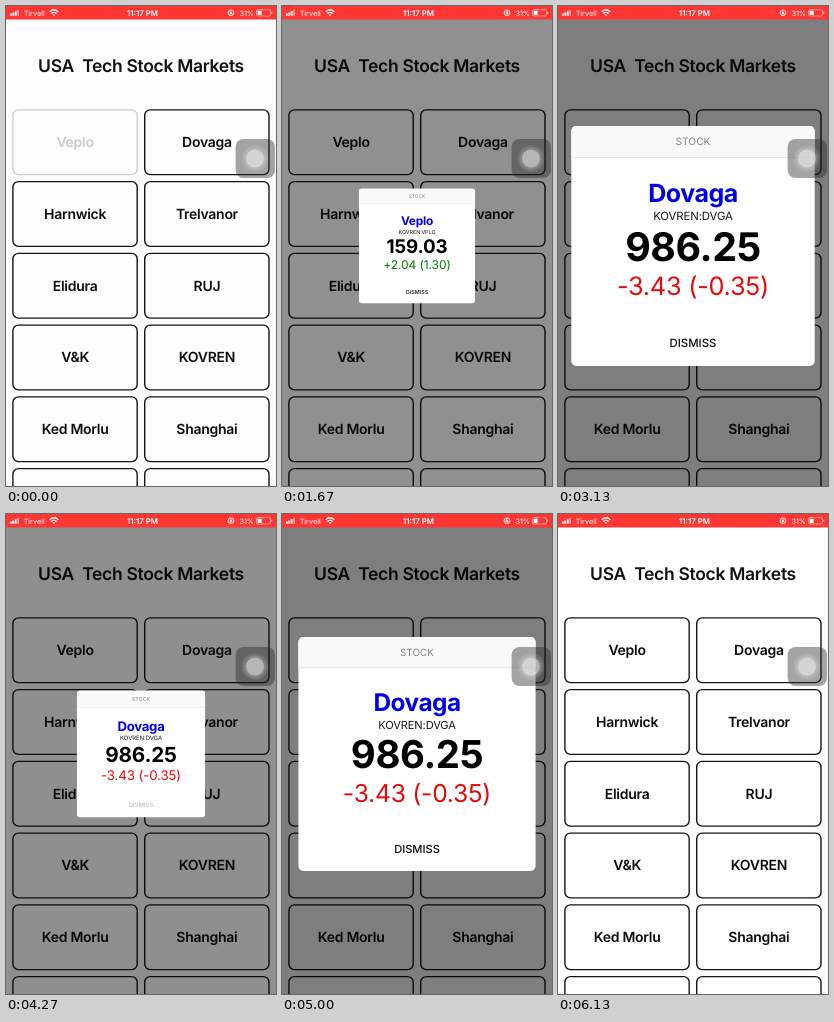
Recreate the animation shown at these times as an HTML page. Size 270x480 px, loop 6.47 s.

```html
<!DOCTYPE html>
<html lang="en">
<head>
<meta charset="utf-8">
<title>Stock markets</title>
<style>
  html, body { margin: 0; width: 100%; height: 100%; overflow: hidden; background: #fefefe; }
  svg { display: block; width: 100vw; height: 100vh; }
  text { font-family: Inter, Roboto, "Liberation Sans", sans-serif; text-anchor: middle;
         text-rendering: geometricPrecision; }
  .title { font-size: 17.5px; font-weight: 600; letter-spacing: -.018em; fill: #111; }
  .label { font-size: 14px; font-weight: 600; letter-spacing: -.02em; fill: #0c0c0c; }
  .box { fill: none; stroke: #141414; stroke-width: 1.4; }
  .bar text { fill: #fff; font-size: 7.3px; }
  .head { font-size: 10.2px; fill: #858585; }
  .name { font-size: 25px; font-weight: 700; letter-spacing: -.02em; fill: #0000e8; }
  .ticker { font-size: 11.4px; letter-spacing: -.01em; fill: #161616; }
  .price { font-size: 39.4px; font-weight: 700; letter-spacing: -.01em; fill: #000; }
  .change { font-size: 25.3px; letter-spacing: -.01em; }
  .dismiss { font-size: 11.4px; font-weight: 500; fill: #0c0c0c; }
</style>
</head>
<body>
<svg viewBox="0 0 270 480" preserveAspectRatio="none">
  <rect width="270" height="480" fill="#fefefe"/>
  <text class="title" x="135" y="66.4">USA&nbsp; Tech Stock Markets</text>
  <g id="grid"></g>
  <rect id="shade" y="13" width="270" height="467" opacity="0"/>

  <g id="popup">
    <rect x="13.3" y="120" width="243.4" height="240" rx="5" fill="#fff"/>
    <path d="M13.3 151.5V125a5 5 0 0 1 5-5H251.7a5 5 0 0 1 5 5V151.5Z" fill="#f8f9fa"/>
    <path d="M13.3 151.5H256.7" stroke="#dfe1e3" stroke-width=".8"/>
    <text class="head" x="135" y="139.2">STOCK</text>
    <text class="name" id="name" x="135" y="196.2"></text>
    <text class="ticker" id="ticker" x="135" y="214"></text>
    <text class="price" id="price" x="135" y="254.8"></text>
    <text class="change" id="change" x="135" y="288.8"></text>
    <text class="dismiss" id="dismiss" x="135" y="341.4">DISMISS</text>
  </g>

  <g class="bar">
    <rect width="270" height="13.5" fill="#fe3735"/>
    <g fill="#fff">
      <rect x="4" y="7.6" width="1.8" height="2.2" rx=".4"/>
      <rect x="6.4" y="6.4" width="1.8" height="3.4" rx=".4"/>
      <rect x="8.8" y="5.1" width="1.8" height="4.7" rx=".4"/>
      <rect x="11.2" y="3.8" width="1.8" height="6" rx=".4" opacity=".5"/>
    </g>
    <text x="28.2" y="9.6">Tirvell</text>
    <g fill="none" stroke="#fff" stroke-width="1.3">
      <path d="M43.8 5.8Q48 1.8 52.2 5.8M45.4 7.6Q48 5.2 50.6 7.6"/>
    </g>
    <path d="M46.7 8.7Q48 7.6 49.3 8.7L48 10Z" fill="#fff"/>
    <text x="136.5" y="9.7" style="font-weight:600;font-size:7.8px">11:17 PM</text>
    <circle cx="225" cy="6.8" r="2.9" fill="none" stroke="#fff" stroke-width=".8"/>
    <rect x="223.7" y="6.3" width="2.6" height="2" fill="#fff"/>
    <path d="M224.2 6.4V5.6a.8 .8 0 0 1 1.6 0V6.4" fill="none" stroke="#fff" stroke-width=".5"/>
    <text x="240.7" y="9.6">31%</text>
    <rect x="250.5" y="3.6" width="14" height="6.4" rx="1.5" fill="none" stroke="#fff" stroke-width=".8" opacity=".6"/>
    <rect x="251.6" y="4.7" width="4" height="4.2" rx=".6" fill="#fff"/>
    <path d="M265.7 5.8V7.8" stroke="#fff" stroke-width="1.1" opacity=".6"/>
  </g>

  <g id="assist">
    <rect x="229.6" y="133" width="39.4" height="39" rx="8" fill="#282828" opacity=".42"/>
    <g fill="#fff">
      <circle cx="249" cy="152.6" r="13.4" opacity=".1"/>
      <circle cx="249" cy="152.6" r="11.2" opacity=".14"/>
      <circle cx="249" cy="152.6" r="9" opacity=".4"/>
    </g>
  </g>
</svg>
<script>
const LOOP = 6470, STEP = 200 / 3, FRAMES = 97;
const LABELS = ["Veplo", "Dovaga", "Harnwick", "Trelvanor", "Elidura", "RUJ",
                "V&K", "KOVREN", "Ked Morlu", "Shanghai", "", ""];
const GREEN = "#008000", RED = "#e60c0c";
const STOCKS = [
  ["Veplo", "KOVREN:VPLO", "159.03", "+2.04 (1.30)", GREEN],
  ["Dovaga", "KOVREN:DVGA", "986.25", "-3.43 (-0.35)", RED],
  ["Harnwick", "KOVREN:HW", "174.21", "+0.47 (0.27)", GREEN]
];
// Each visit: button pressed, popup opens, data arrives, popup closes.
const VISITS = [
  { press: -60, open: -10, data: -10, close: 1615.5 },
  { press: 2199, open: 2300, data: 2866, close: 4218, tap: 4129 },
  { press: 4730, open: 4765, data: 5399, close: 5934 }
];

const $ = id => document.getElementById(id);
const clamp = x => Math.min(1, Math.max(0, x));
const ease = x => {
  x = clamp(x);
  return x < .5 ? 2 * x * x : 1 - 2 * (1 - x) ** 2;
};

// Slightly underdamped spring from 0 to 1.
function spring(ms) {
  if (ms <= 0) return 0;
  const t = ms / 1000, decay = 15.5, freq = 8.96;
  return 1 - Math.exp(-decay * t) * (Math.cos(freq * t) + decay / freq * Math.sin(freq * t));
}

// Opacity of a touchable: drops at once, then eases back after release.
function touch(t, down, up) {
  return t < down ? 1 : .2 + .8 * ease((t - up) / 250);
}

function add(parent, tag, attrs) {
  const el = document.createElementNS("http://www.w3.org/2000/svg", tag);
  for (const key in attrs) el.setAttribute(key, attrs[key]);
  return parent.appendChild(el);
}

const buttons = LABELS.map((label, i) => {
  const x = 6.9 + i % 2 * 131.8, y = 103.9 + Math.floor(i / 2) * 71.75;
  const g = add($("grid"), "g", {});
  add(g, "rect", { class: "box", x, y, width: 124.3, height: 64.7, rx: 5.5 });
  add(g, "text", { class: "label", x: x + 62.2, y: y + 37.3 }).textContent = label;
  return g;
});

let shown = -1;
function fill(i) {
  if (i === shown) return;
  shown = i;
  ["name", "ticker", "price", "change"].forEach((id, k) => $(id).textContent = STOCKS[i][k]);
  $("change").setAttribute("fill", STOCKS[i][4]);
}

function draw(t) {
  let current = 0, stock = 0;
  VISITS.forEach((v, i) => {
    if (t >= v.press) current = i;
    if (t >= v.data) stock = i;
    buttons[i].setAttribute("opacity", touch(t, v.press, v.open + 20));
  });
  const v = VISITS[current], gone = t - v.close;
  const scale = spring(t - v.open) * (1 - ease(gone / 100));
  const shade = .5 * ease((t - v.open) / 150) * (1 - ease(gone / 200));
  fill(stock);
  $("shade").setAttribute("opacity", shade);
  $("popup").setAttribute("display", scale > .001 ? "inline" : "none");
  $("popup").setAttribute("transform", `translate(135 240) scale(${scale}) translate(-135 -240)`);
  $("dismiss").setAttribute("opacity", v.tap ? touch(t, v.tap, v.close) : 1);
}

const start = performance.now();
function tick() {
  const t = (performance.now() - start) % LOOP;
  draw(Math.min(FRAMES - 1, Math.floor((t + 4) / STEP)) * STEP);
  requestAnimationFrame(tick);
}
tick();
</script>
</body>
</html>
```
